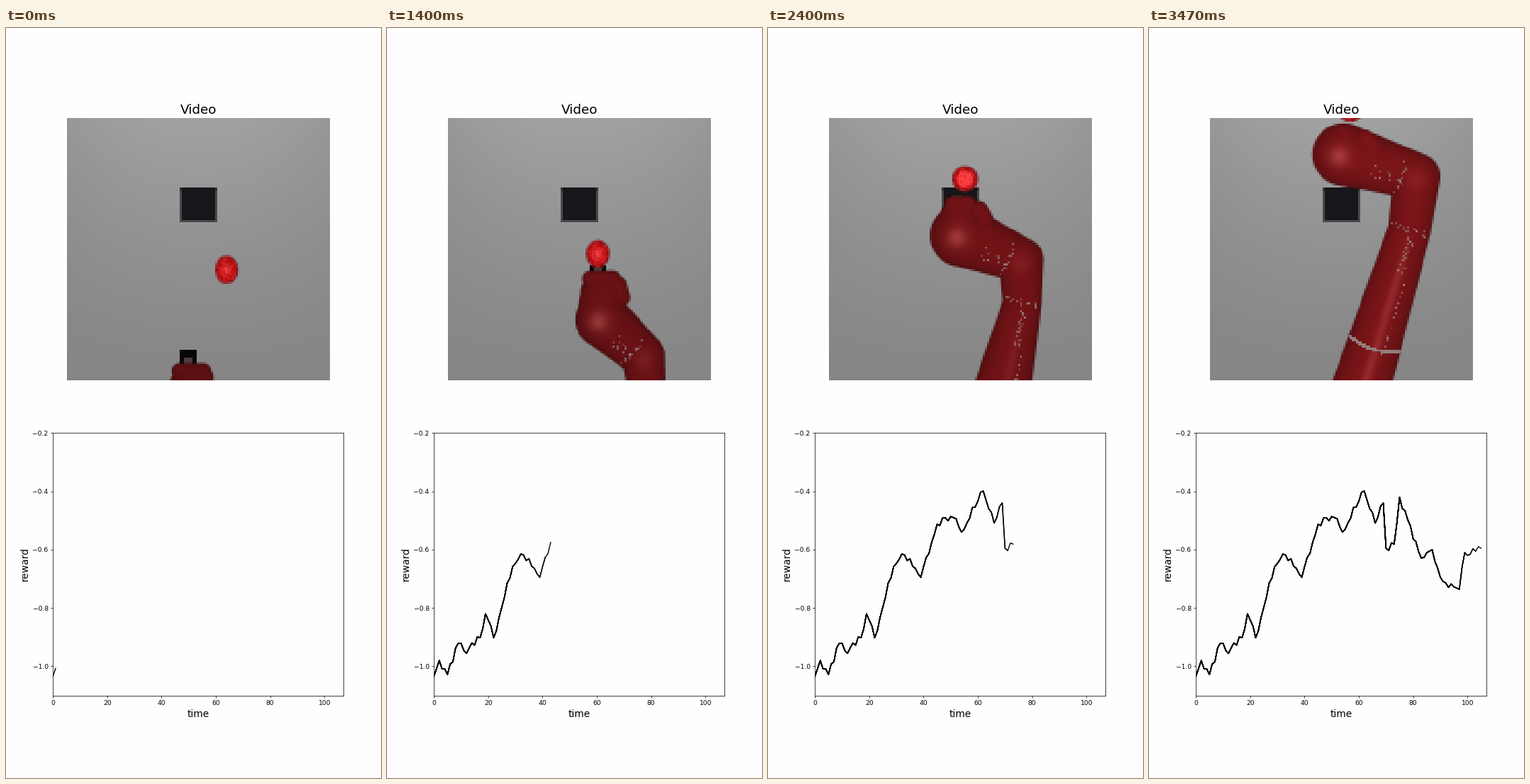
A matplotlib script that plays this animation: 529 px wide and 1058 px high, repeating every 3540 ms.

```python
import matplotlib.pyplot as plt
import numpy as np
from matplotlib.animation import FuncAnimation

FRAMES, INTERVAL = 59, 60
STEP_MS, END_MS = 200 / 3, 3470
N = 128                      # camera resolution
LEFT, TOP, SIDE = 85.9, 127.0, 370.3
PX = SIDE / N
PAGE = "#fefdff"

# Time, then head and elbow positions in stage pixels.
POSES = np.array([(0, 264, 560, 330, 640), (600, 318, 495, 380, 565),
                  (1400, 304, 412, 361, 463), (2000, 272, 345, 347, 381),
                  (2800, 272, 242, 366, 275), (END_MS, 274, 179, 377, 210)])

# Turning points of the reward curve.
TURNS = [0, 2, 5, 9, 12, 17, 19, 22, 29, 33, 39, 45, 51, 54, 62, 66, 69, 70, 73,
         75, 83, 87, 91, 97, 99, 105]
LOSS = [1.035, .98, 1.028, .921, .956, .902, .82, .902, .658, .618, .695, .513,
        .49, .54, .399, .509, .44, .595, .581, .42, .629, .6, .709, .736, .61, .595]

rng = np.random.default_rng(4)
STEPS = np.arange(106)
JITTER = rng.uniform(-.015, .015, STEPS.size)
JITTER[TURNS] = 0
REWARD = JITTER - np.interp(STEPS, TURNS, LOSS)

centres = (np.arange(N) + .5) * PX
X, Y = np.meshgrid(LEFT + centres, TOP + centres)
NOISE = rng.uniform(-1, 1, (16, 16))


def speckles(u0, u1, v0, v1, count):
    return np.column_stack([rng.uniform(u0, u1, count), rng.uniform(v0, v1, count),
                            rng.uniform(.25, .75, count)])


# Worn paint, placed along and across each link.
WEAR = [("head", "elbow", speckles(.4, .85, -.5, 0, 14)),
        ("head", "elbow", speckles(.78, .84, -.9, .5, 10)),
        ("neck", "base", speckles(-.02, .02, -.9, .9, 16)),
        ("neck", "base", speckles(.03, .26, .05, .32, 26)),
        ("neck", "base", speckles(.25, .72, .38, .48, 22))]


def ramp(t, start, end):
    return np.clip((t - start) / (end - start), 0, 1)


def pose(t):
    """Joints as (x, y, radius); the outer links follow head and elbow."""
    hx, hy, ex, ey = (np.interp(t, POSES[:, 0], col) for col in POSES.T[1:])
    p, reach = t / END_MS, ramp(t, 2000, END_MS)
    nx, ny = ex + 6 - 16 * reach, ey + 54 + 21 * reach
    return dict(
        head=np.array([hx, hy, 39 + 5 * ramp(t, 1400, 2400)]),
        elbow=np.array([ex, ey, 29 + 4 * p]),
        neck=np.array([nx, ny, 26 + 4 * reach]),
        base=np.array([nx - 48 - 26 * reach, ny + 240, 65 - 23 * np.sqrt(reach)]),
        wrist=np.array([hx - 3 + 3 * p, hy - 57 + 45 * p, 30 - 2 * p]))


def paint(img, colour, alpha):
    alpha = np.asarray(alpha, float)[..., None]
    img += (np.asarray(colour, float) - img) * alpha


def box_mask(x0, x1, y0, y1):
    return ((X > x0) & (X < x1) & (Y > y0) & (Y < y1)).astype(float)


def capsule(a, b):
    """Coverage and relative surface height of a tapered capsule."""
    dx, dy = b[0] - a[0], b[1] - a[1]
    u = np.clip(((X - a[0]) * dx + (Y - a[1]) * dy) / (dx * dx + dy * dy + 1e-9), 0, 1)
    d = np.hypot(X - a[0] - u * dx, Y - a[1] - u * dy)
    r = a[2] + u * (b[2] - a[2])
    return np.clip((r - d) / PX + .5, 0, 1), np.sqrt(np.clip(1 - (d / r) ** 2, 0, 1))


def make_scene():
    x, y = (X - LEFT) / SIDE, (Y - TOP) / SIDE
    grey = 134 + 28 * (1 - y) ** 1.2 - 10 * (2 * x - 1) ** 2 * (1 - y)
    img = np.stack([grey, grey, grey + 1], -1)
    img[34:51, 55:73] = 74, 73, 75
    img[34:36, 55:73] = 50, 49, 51
    img[34:50, 56:72] = 24, 22, 26
    return img


SCENE = make_scene()


def draw_fingers(img, wrist, t):
    height = max(0, 19 - t / 150)
    x, y = wrist[0] - 4.5, wrist[1] - wrist[2]
    visible = height > 1
    paint(img, (8, 7, 8), visible * box_mask(x - 11.5, x + 11.5, y - height, y + 6))
    paint(img, (78, 62, 62), visible * box_mask(x - 6, x + 6, y - .45 * height, y + 6))


def draw_puck(img, wrist, t):
    # It rests until the rising hand pushes it along.
    x = np.interp(t, [1190, 1400, 2000, END_MS], [310.5, 297, 275, 284])
    y = min(341.5, wrist[1] - 54)
    glow = ramp(t, 1190, 2400)
    rx = 16.3 + 3.7 * ramp(t, 1190, END_MS)
    ry = rx + 3.5 * (1 - glow)
    q = np.hypot((X - x) / rx, (Y - y) / ry)
    disc = glow * np.clip((.68 - q) / .15, 0, 1)
    spot = (1 - glow) * np.exp(-(q / .35) ** 2)
    rim = np.clip((q - .7) / .3, 0, 1)
    colour = (np.array([190, 18, 21]) + disc[..., None] * np.array([60, 42, 42])
              + spot[..., None] * np.array([40, 45, 45])
              + rim[..., None] * np.array([-60, 8, 8]))
    ix = np.floor((X - x) / PX).astype(int) % 16
    iy = np.floor((Y - y) / PX).astype(int) % 16
    colour = colour + NOISE[iy, ix][..., None] * np.array([18, 10, 10])
    paint(img, np.clip(colour, 0, 255), np.clip((1 - q) * rx / PX + .5, 0, 1))


def draw_arm(img, joints, t):
    head, elbow, neck, base, wrist = (
        joints[k] for k in ("head", "elbow", "neck", "base", "wrist"))
    p = t / END_MS
    wx, wy = wrist[:2]
    grip = 17 * (1 - p ** 3)
    links = [(base, neck), (neck, elbow), (elbow, head), (head, wrist),
             ((wx + 18 + 12 * p, wy - 10, 13), (wx + 20 + 23 * p, wy + 12 - 11 * p, 11)),
             ((wx - grip, wy - 19, 11), (wx + grip, wy - 19, 11))]
    shapes = [capsule(a, b) for a, b in links]
    cover = np.max([s[0] for s in shapes], axis=0)
    height = np.max([s[1] for s in shapes], axis=0)

    colour = np.array([116, 20, 23]) * ((.82 + .24 * p) * (.62 + .38 * height))[..., None]
    shine = np.exp(-((X - head[0] + 6) ** 2 + (Y - head[1] - 3) ** 2) / 190)
    shine = shine + .3 * np.exp(-((X - elbow[0]) ** 2 + (Y - elbow[1] - 6) ** 2) / 170)

    # Coordinates along and across the lower link.
    axis = base[:2] - neck[:2]
    length = np.hypot(*axis)
    ux, uy = axis / length
    along = (X - neck[0]) * ux + (Y - neck[1]) * uy
    radius = neck[2] + (base[2] - neck[2]) * np.clip(along / length, 0, 1)
    across = ((X - neck[0]) * uy - (Y - neck[1]) * ux) / radius
    streak = np.exp(-((across - .1) / .17) ** 2) * np.clip(along / 60, 0, 1)
    shine = shine + .55 * ramp(t, 2000, 2900) * streak
    paint(img, colour + shine[..., None] * np.array([44, 36, 35]), cover)

    ring = np.abs(along - 167 - 9 * (1 - across ** 2)) < 2.4
    paint(img, (150, 138, 138), ring * (np.abs(across) < 1) * cover * .9)

    for start, end, marks in WEAR:
        a, b = joints[start], joints[end]
        d = b[:2] - a[:2]
        normal = np.array([d[1], -d[0]]) / np.hypot(*d)
        for u, v, alpha in marks:
            x, y = a[:2] + u * d + v * (a[2] + u * (b[2] - a[2])) * normal
            i, j = int((y - TOP) // PX), int((x - LEFT) // PX)
            if 0 <= i < N and 0 <= j < N and cover[i, j] > .9:
                img[i, j] += (np.array([150, 135, 135]) - img[i, j]) * alpha


def camera(t):
    img = SCENE.copy()
    joints = pose(t)
    draw_fingers(img, joints["wrist"], t)
    draw_puck(img, joints["wrist"], t)
    draw_arm(img, joints, t)
    return np.clip(img, 0, 255).astype(np.uint8)


fig, (video, chart) = plt.subplots(2, 1, figsize=(8, 16), dpi=66.125)
fig.set_facecolor(PAGE)
video.set_title("Video", fontsize=20)
video.axis("off")
picture = video.imshow(camera(0), interpolation="nearest")

chart.set_facecolor(PAGE)
chart.set_xlim(0, 107)
chart.set_ylim(-1.1, -.2)
chart.set_xlabel("time", fontsize=15)
chart.set_ylabel("reward", fontsize=15)
# Overlaid strokes make older parts of the curve heavier than its tip.
strokes = [chart.plot([], [], color="black")[0] for _ in range(10)]


def update(frame):
    step = int((frame * INTERVAL + 50) / STEP_MS)
    picture.set_data(camera(step * STEP_MS))
    for lag, stroke in enumerate(strokes):
        n = max(0, 2 * (step - lag + 1))
        stroke.set_data(STEPS[:n], REWARD[:n])
    return [picture, *strokes]


anim = FuncAnimation(fig, update, frames=FRAMES, interval=INTERVAL,
                     repeat=True, repeat_delay=0, blit=False)
plt.show()
```
